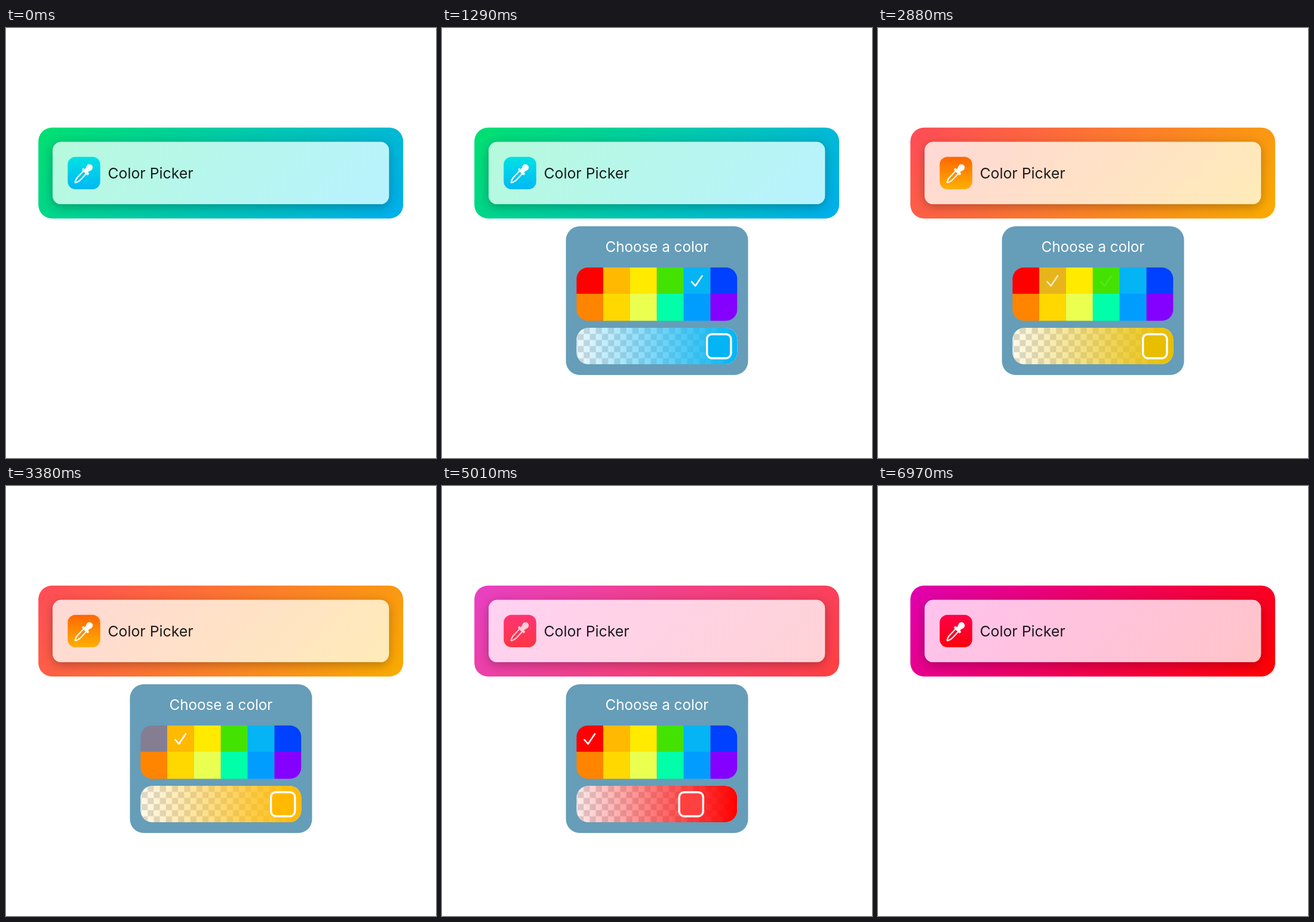
Write an HTML page that moves like this. It is 720 px wide and 720 px high and loops after 7220 ms.

```html
<!DOCTYPE html>
<html lang="en">
<head>
<meta charset="utf-8">
<title>Color Picker</title>
<style>
  html, body { margin: 0; width: 100%; height: 100%; overflow: hidden; background: #fff; }
  svg { display: block; width: 100vw; height: 100vh; }
  text { font-family: Inter, Roboto, "Open Sans", sans-serif; }
</style>
</head>
<body>
<svg viewBox="0 0 720 720">
  <defs>
    <linearGradient id="outerFill" gradientUnits="userSpaceOnUse" x1="168.7" y1="52.2" x2="550.3" y2="433.8"><stop/><stop offset="1"/></linearGradient>
    <linearGradient id="innerFill" gradientUnits="userSpaceOnUse" x1="192.7" y1="76.2" x2="526.3" y2="409.8"><stop/><stop offset="1"/></linearGradient>
    <linearGradient id="iconFill" x2="0" y2="1"><stop/><stop offset="1"/></linearGradient>
    <linearGradient id="alphaFill"><stop stop-opacity=".08"/><stop offset="1"/></linearGradient>
    <pattern id="checker" patternUnits="userSpaceOnUse" x="227" y="502" width="20.4" height="20.4">
      <path d="M10.2 0h10.2v10.2h-10.2zM0 10.2h10.2v10.2h-10.2z" fill="#dadada"/>
    </pattern>
    <filter id="blur" x="-20%" y="-60%" width="140%" height="220%"><feGaussianBlur stdDeviation="9"/></filter>
    <clipPath id="cardClip"><rect x="54.2" y="166.7" width="610.8" height="152.4" rx="23"/></clipPath>
    <clipPath id="swatchClip"><rect x="225.3" y="401" width="269" height="89.2" rx="19"/></clipPath>
    <clipPath id="sliderClip"><rect x="225.3" y="502" width="269" height="61" rx="20"/></clipPath>
  </defs>

  <g clip-path="url(#cardClip)">
    <rect id="outer" x="54" y="166" width="611" height="154" fill="url(#outerFill)"/>
    <rect x="78" y="195" width="563" height="104" rx="14" opacity=".27" filter="url(#blur)"/>
  </g>
  <rect x="78.2" y="190.8" width="563" height="104.2" rx="14" fill="#fff"/>
  <rect id="inner" x="78.2" y="190.8" width="563" height="104.2" rx="14" fill="url(#innerFill)"/>
  <rect id="icon" x="103.3" y="215.8" width="54.5" height="54.2" rx="13" fill="url(#iconFill)"/>
  <g id="dropper" transform="translate(115.5 259.2) rotate(43.5) scale(.96)" fill="#fff">
    <path d="M-3.3-25V-9Q-3-6-1-1.5Q0 .5 1-1.5Q3-6 3.3-9V-25" fill="none" stroke="#fff" stroke-width="2.2"/>
    <rect x="-7.5" y="-29" width="15" height="4.6" rx="2.3"/>
    <path d="M-4-28Q-3.5-31-5-34A5.7 5.7 0 1 1 5-34Q3.5-31 4-28z"/>
  </g>
  <text x="170.5" y="252" font-size="24.8" fill="#000" fill-opacity=".88">Color Picker</text>

  <g id="panel">
    <rect x="207.5" y="332" width="305" height="249" rx="23" fill="#669db8"/>
    <text x="360" y="374.5" font-size="24.2" text-anchor="middle" fill="#fff">Choose a color</text>
    <g id="swatches" clip-path="url(#swatchClip)"></g>
    <g id="checks" fill="none" stroke="#fff" stroke-width="2.6" stroke-linecap="round" stroke-linejoin="round"></g>
    <g id="slider" clip-path="url(#sliderClip)">
      <rect fill="#fff"/><rect fill="url(#checker)"/><rect fill="url(#alphaFill)"/>
    </g>
    <g id="thumb" stroke="#fff" stroke-width="3.3">
      <rect x="-20" y="512.8" width="40" height="40" rx="8" fill="#fff"/>
      <rect id="thumbColor" x="-20" y="512.8" width="40" height="40" rx="8"/>
    </g>
  </g>
</svg>
<script>
const LOOP = 7220;
const COLORS = [
  '#ff0000', '#ffb900', '#ffea00', '#43e200', '#04b4f4', '#0040ff',
  '#ff8400', '#ffd800', '#eaff50', '#00ffa8', '#009dff', '#8400ff'
];
// Each pick: time, swatch, then start and end colors of card, inset and icon.
const PICKS = [
  { at: -1000, cell: 4, outer: ['#00e070', '#00aeee'], inner: ['#b6fadc', '#b8f2ff'], icon: ['#00e2e4', '#00b8f4'] },
  { at: 1600, cell: 5, outer: ['#00bac4', '#0040ff'], inner: ['#b8eefd', '#bfd6ff'], icon: ['#0096ff', '#0040ff'] },
  { at: 2220, cell: 3, outer: ['#e0d000', '#20d830'], inner: ['#f6fac0', '#c0f8c0'], icon: ['#90e800', '#43e200'] },
  { at: 2760, cell: 1, outer: ['#ff4b58', '#f9ac00'], inner: ['#ffd8d5', '#ffebb8'], icon: ['#ff6600', '#ffb000'] },
  { at: 3400, cell: 0, outer: ['#e000b0', '#ff0000'], inner: ['#ffc2ee', '#ffc4c8'], icon: ['#ff0048', '#fc000c'] }
];
const CARD_FADE = 120, PICK_FADE = 138;
const GRID_X = 225, CELL = 44.9;
const THUMB_X = 463.7;

const $ = id => document.getElementById(id);
const clamp = v => Math.max(0, Math.min(1, v));
const ramp = (t, start, length) => clamp((t - start) / length);
const easeOut = p => 1 - (1 - p) ** 3;

function make(parent, tag, attrs) {
  const node = document.createElementNS('http://www.w3.org/2000/svg', tag);
  set(node, attrs);
  return parent.appendChild(node);
}

function set(node, attrs) {
  for (const key in attrs) node.setAttribute(key, attrs[key]);
}

function mix(a, b, p) {
  const channel = (hex, i) => parseInt(hex.slice(1 + 2 * i, 3 + 2 * i), 16);
  return `rgb(${[0, 1, 2].map(i => Math.round(channel(a, i) * (1 - p) + channel(b, i) * p))})`;
}

const swatches = COLORS.map((fill, i) => make($('swatches'), 'rect', {
  x: GRID_X + (i % 6) * CELL, y: i < 6 ? 401 : 445,
  width: 45, height: i < 6 ? 44 : 46, fill
}));
const checks = PICKS.map(({ cell }) => make($('checks'), 'path', {
  d: `M${GRID_X + (cell + 0.5) * CELL - 9} 424.8l6.3 7l11.2-16.8`
}));
for (const rect of $('slider').children) set(rect, { x: 225, y: 501, width: 270, height: 63 });

function drawColors(t) {
  let current = 0;
  PICKS.forEach((pick, i) => { if (t >= pick.at) current = i; });
  const now = PICKS[current], last = PICKS[Math.max(0, current - 1)];
  const cardFade = ramp(t, now.at, CARD_FADE), pickFade = ramp(t, now.at, PICK_FADE);

  for (const part of ['outer', 'inner', 'icon']) {
    [...$(part + 'Fill').children].forEach((stop, i) =>
      set(stop, { 'stop-color': mix(last[part][i], now[part][i], cardFade) }));
  }
  const color = mix(COLORS[last.cell], COLORS[now.cell], pickFade);
  for (const stop of $('alphaFill').children) set(stop, { 'stop-color': color });
  set($('thumbColor'), { fill: color });

  PICKS.forEach((pick, i) => {
    const shown = i === current ? pickFade : i === current - 1 ? 1 - pickFade : 0;
    const pressed = ramp(t, pick.at - 90, 40) * (1 - ramp(t, pick.at, 150));
    const opacity = 1 - 0.8 * pressed;
    set(swatches[pick.cell], { opacity });
    set(checks[i], { opacity: shown * opacity });
  });
}

function drawAlpha(t) {
  const drag = (1 - Math.cos(2 * Math.PI * ramp(t, 3888, 1400))) / 2;
  const offset = 137 * drag;
  const alpha = 1 - offset / 185;
  set($('thumb'), { transform: `translate(${THUMB_X - offset} 0)` });
  set($('thumbColor'), { 'fill-opacity': alpha });
  for (const part of ['outer', 'inner', 'icon', 'dropper']) set($(part), { opacity: alpha });
}

function drawPanel(t) {
  const open = easeOut(ramp(t, 750, 350)) * (1 - easeOut(ramp(t, 6340, 350)));
  const scale = 0.5 + 0.5 * open;
  set($('panel'), {
    opacity: open,
    transform: `translate(360 332) scale(${scale}) translate(-360 -332)`
  });
}

function render(t) {
  drawColors(t);
  drawAlpha(t);
  drawPanel(t);
}

const start = performance.now();
function tick() {
  render((performance.now() - start) % LOOP);
  requestAnimationFrame(tick);
}
tick();
</script>
</body>
</html>
```
